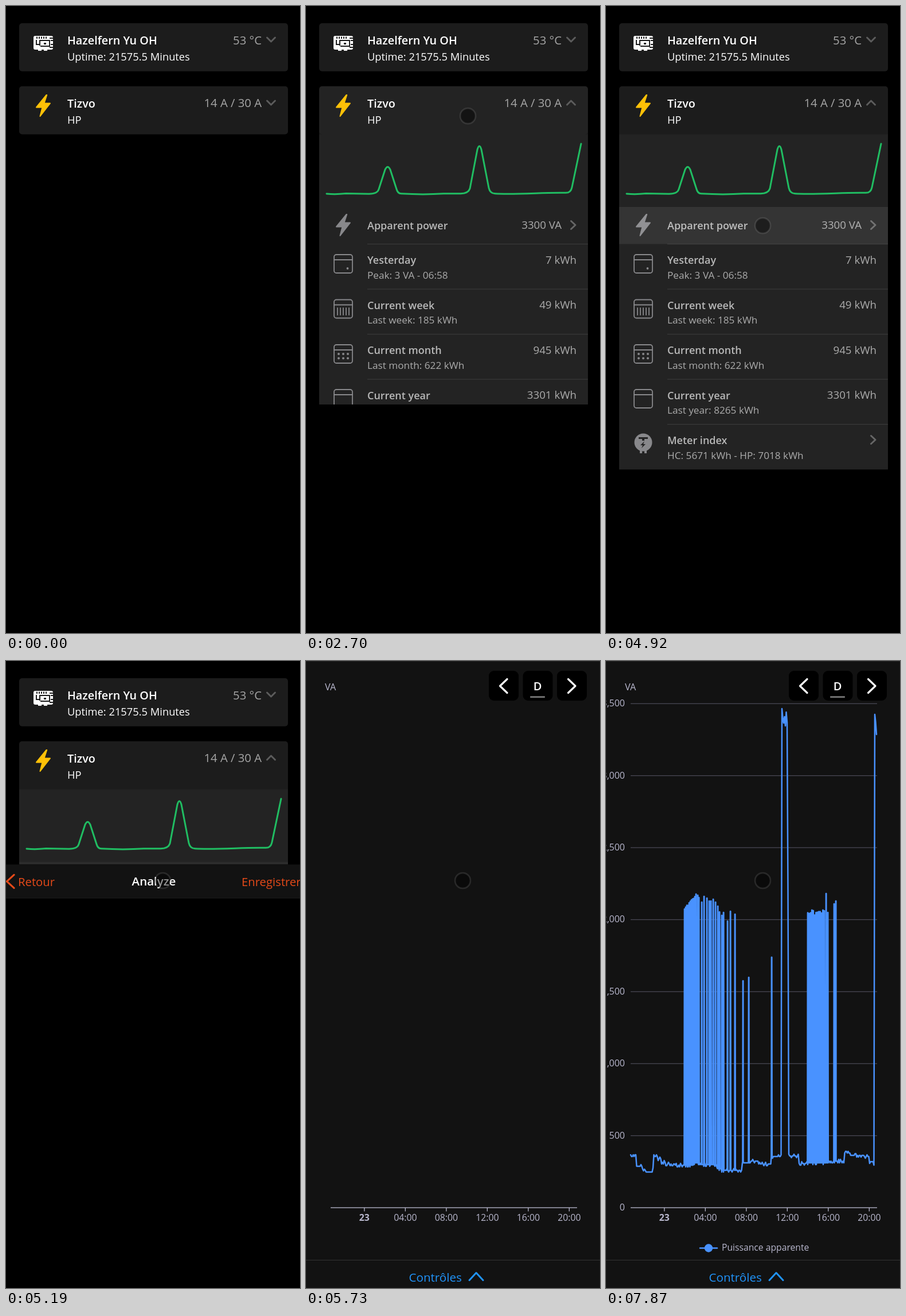
These frames come from a looping animation (513x1092 px, 8000 ms). An HTML page:

```html
<!DOCTYPE html>
<html lang="en">
<head>
<meta charset="utf-8">
<title>Energy dashboard</title>
<style>
  html, body { margin: 0; width: 100%; height: 100%; overflow: hidden; background: #000; }
  svg { display: block; width: 100vw; height: 100vh; font-family: "Open Sans", "Noto Sans", sans-serif; }
  .semi { font-weight: 600; }
  .bold { font-weight: 700; }
  .line { fill: none; stroke-linecap: round; stroke-linejoin: round; }
</style>
</head>
<body>
<svg id="stage" viewBox="0 0 513 1092" preserveAspectRatio="none"></svg>
<script>
const stage = document.getElementById('stage');
const LOOP = 8000;

// Markup helpers
const text = (x, y, size, fill, content, anchor = 'start', cls = '') =>
  `<text x="${x}" y="${y}" font-size="${size}" fill="${fill}" text-anchor="${anchor}" class="${cls}">${content}</text>`;
const rect = (x, y, w, h, fill, r = 0, extra = '') =>
  `<rect x="${x}" y="${y}" width="${w}" height="${h}" rx="${r}" fill="${fill}" ${extra}/>`;
const line = (d, color, width, extra = '') =>
  `<path class="line" d="${d}" stroke="${color}" stroke-width="${width}" ${extra}/>`;
const dot = (x, y, r, fill) => `<circle cx="${x}" cy="${y}" r="${r}" fill="${fill}"/>`;
const range = (n, fn) => Array.from({ length: n }, (_, i) => fn(i)).join('');
const bolt = (y, fill) =>
  `<path d="M70.5 155 53 176.5H63.5L59.5 192 77 169.5H66.5L71.2 155Z" transform="translate(0 ${y})"
    fill="${fill}" stroke="${fill}" stroke-width="2" stroke-linejoin="round"/>`;

function card(y, title, sub, value) {
  return text(107, y + 37, 19.8, '#fff', title, 'start', 'semi')
    + text(107, y + 65, 18.3, '#fff', sub)
    + text(446, y + 36.5, 20.3, '#a6a6a6', value, 'end');
}

function boardIcon() {
  const dark = '#1c1c1c';
  return rect(48, 52, 34, 24, '#fff', 3) + rect(56, 75, 6, 3, '#fff') + rect(66, 75, 6, 3, '#fff')
    + range(5, i => rect(53 + i * 4, 53.5, 2, 3.5, dark))
    + rect(76, 55, 6, 2, dark) + rect(78, 59, 4, 2, dark) + rect(78, 66, 4, 2, dark)
    + rect(52, 59, 2, 7, dark) + rect(52, 66, 6, 2, dark) + rect(58, 59, 17, 2, dark)
    + rect(58, 59, 2, 10, dark) + rect(75, 59, 2, 12, dark) + rect(60, 69, 15, 2, dark)
    + rect(66, 64, 4, 3, dark) + rect(76, 71, 6, 2, dark);
}

const GREY = '#88888b';
function calendar(y, marks) {
  return rect(49, y, 32, 32, 'none', 4, `stroke="${GREY}" stroke-width="1.8"`)
    + line(`M49 ${y + 9}H81`, GREY, 1.8) + marks;
}

function row(i, title, sub, value) {
  const y = 414.5 + i * 78.5;
  return rect(107, y - 0.5, 385, 1.2, '#3a3a3a')
    + text(107, y + 34.5, 18, '#b8b8b8', title, 'start', 'semi')
    + text(107, y + 60, 17.2, '#acacac', sub)
    + text(472, y + 34, 18.7, '#acacac', value, 'end');
}

function meterIcon() {
  const dark = '#232323';
  return dot(65, 760, 15.5, GREY) + rect(59, 772, 4, 7, GREY) + rect(67, 772, 4, 7, GREY)
    + rect(57, 751, 16, 3, dark) + rect(63, 751, 4, 6, dark)
    + `<path d="M67 758 60 765H64L62 770 69 763H65Z" fill="${dark}"/>`;
}

const sparkline = 'M36 327Q52 328.500 70 326.500Q95 327 110 327.300Q125 327 127 319L138 285Q142.500 275.500 147 285'
  + 'L158 319Q160 326.500 166 326.800Q205 329 240 326.800H270Q283 326.500 286 318L299 250Q302.500 238 306 250'
  + 'L319 317Q321 326.500 330 326.800Q350 328 400 326.300Q430 325 452 325.300Q462 326 464 316L480 240';

const panel = rect(23, 215, 469, 9, '#1c1c1c') + rect(23, 223.5, 469, 584, '#232323')
  + line(sparkline, '#20bd62', 3)
  + bolt(208, GREY)
  + text(107, 388.5, 18, '#b8b8b8', 'Apparent power', 'start', 'semi')
  + text(446, 388, 18.7, '#acacac', '3300 VA', 'end')
  + line('M462.500 374.500 470 381.500 462.500 388.500', '#666', 3)
  + row(0, 'Yesterday', 'Peak: 3 VA - 06:58', '7 kWh')
  + row(1, 'Current week', 'Last week: 185 kWh', '49 kWh')
  + row(2, 'Current month', 'Last month: 622 kWh', '945 kWh')
  + row(3, 'Current year', 'Last year: 8265 kWh', '3301 kWh')
  + row(4, 'Meter index', 'HC: 5671 kWh - HP: 7018 kWh', '')
  + line('M462.500 748.500 470 755.500 462.500 762.500', '#666', 3)
  + calendar(433, dot(72.5, 457, 1.9, GREY))
  + calendar(511.5, range(5, i => line(`M${55 + i * 5} 526V538`, GREY, 1.8)))
  + calendar(590, range(6, i => dot(57 + i % 3 * 8, 606 + (i > 2) * 7.5, 2, GREY)))
  + calendar(668, '') + meterIcon();

// Power curve: stepped base load with jitter, plus short load spikes
let seed = 11;
const random = () => (seed = seed * 16807 % 2147483647) / 2147483647;

const baseLoad = [[43, 863], [48, 860], [53, 880], [64, 885], [68, 890], [81, 886], [82.5, 863], [90, 867],
  [97, 873], [104, 876], [120, 878], [152, 874], [162, 877], [195, 884], [202, 887], [238, 874], [252, 871],
  [266, 876], [288, 863], [306, 83], [308, 100], [309.5, 108], [311, 100], [312.5, 110], [314, 86],
  [315, 104], [317, 398], [318, 862], [336, 875], [352, 874], [388, 871], [416, 857], [426, 861],
  [450, 863], [460, 875], [468.5, 93], [470, 110], [471, 128]];
const spikes = [[160, 408], [162, 412], [167, 420], [171, 410], [176, 413], [180, 418], [183, 418], [187, 415],
  [191, 420], [195, 427], [198, 437], [202, 443], [205, 438], [212, 453], [217, 436], [225, 441], [239, 557],
  [249, 551], [289, 516], [384, 405], [387, 438], [398, 423], [401, 418]];

function powerCurve() {
  const baseAt = x => baseLoad.findLast(p => p[0] <= x)[1];
  const points = [];
  for (let x = 43; x <= 472; x += 1.5) {
    const r = random();
    points.push([x, baseAt(x) + (r < 0.2 ? -3 : r > 0.8 ? 3 : 0)]);
  }
  const all = [...spikes];
  for (let x = 137; x < 158; x += 2) all.push([x, 433 - (x - 137) * 1.2 - random() * 3]);
  for (let x = 352; x < 381; x += 2.4) all.push([x, 430 + random() * 13]);
  for (const [x, top] of all) {
    const base = baseAt(x);
    points.push([x - 0.6, base], [x - 0.1, top], [x + 0.3, top], [x + 0.8, base]);
  }
  points.sort((a, b) => a[0] - b[0]);
  return 'M' + points.map(p => p.map(v => v.toFixed(1))).join('L');
}

const AXIS = '#b9b8ce', BLUE = '#4992ff', ORANGE = '#e64a19', LINK = '#2094fa';
const hours = ['23', '04:00', '08:00', '12:00', '16:00', '20:00'];
const loads = ['0', '500', '1,000', '1,500', '2,000', '2,500', '3,000', '3,500'];

const chartPage = rect(0, 1, 513, 1042, '#121212')
  + `<g id="data">`
  + loads.map((label, i) => {
    const y = 952 - i * 125.4;
    return (i ? rect(43, y - 0.6, 430, 1.3, '#484753') : '') + text(33, y + 5, 16, AXIS, label, 'end');
  }).join('')
  + `<g clip-path="url(#reveal)">` + line(powerCurve(), BLUE, 2.5) + `</g>`
  + line('M164 1022.500H194', BLUE, 2.5) + dot(179, 1022.5, 7.2, BLUE)
  + text(202, 1026.5, 15.7, AXIS, 'Puissance apparente') + `</g>`
  + rect(43, 951.5, 430, 1.3, AXIS)
  + hours.map((label, i) => {
    const x = 101.8 + i * 71.5;
    return rect(x - 0.6, 952, 1.3, 6.5, AXIS) + text(x, 974.5, 15.8, AXIS, label, 'middle', i ? '' : 'bold');
  }).join('')
  + text(33, 51, 16.2, AXIS, 'VA')
  + [319, 378.5, 438].map(x => rect(x, 17, 52, 52, '#000', 9)).join('')
  + line('M351 31.500 338.500 43.500 351 55.500M457.500 31.500 470 43.500 457.500 55.500', '#fff', 3.2)
  + text(404, 51, 20, '#fff', 'D', 'middle', 'semi') + rect(391, 61.3, 26, 2.6, '#777', 1);

const popup = rect(0, -58, 513, 1150, '#000')
  + rect(0, -58, 513, 58, '#121212') + rect(0, 0, 513, 1, '#222')
  + line('M14 -40 1.500 -28.500 14 -17', ORANGE, 3.2)
  + text(21, -20.5, 20.3, ORANGE, 'Retour') + text(411, -20.5, 20.3, ORANGE, 'Enregistrer')
  + text(258, -21, 20.5, '#fff', 'Analyze', 'middle', 'semi')
  + rect(0, 1043, 513, 49, '#121212') + rect(0, 1043, 513, 1, '#333')
  + text(179.5, 1081, 20.6, LINK, 'Contrôles') + line('M285 1078.500 297 1065.500 309 1078.500', LINK, 3)
  + `<g id="chartPage">${chartPage}</g>`;

stage.innerHTML = `<defs>
    <clipPath id="fold"><rect id="foldRect" x="23" y="215" width="469" height="0"/></clipPath>
    <clipPath id="reveal"><rect id="revealRect" x="40" y="60" width="0" height="900"/></clipPath>
  </defs>`
  + rect(0, 0, 513, 1092, '#000')
  + rect(23, 30, 469, 83.7, '#1c1c1c', 5) + rect(23, 139.7, 469, 83.8, '#1c1c1c', 5)
  + `<g clip-path="url(#fold)">${panel}</g>`
  + rect(23, 139.7, 469, 83.8, '#fff', 5, 'id="cardTap"') + rect(23, 350, 469, 64.5, '#fff', 0, 'id="rowTap"')
  + boardIcon() + card(30, 'Hazelfern Yu OH', 'Uptime: 21575.5 Minutes', '53 °C')
  + bolt(0, '#ffc107') + card(139.8, 'Tizvo', 'HP', '14 A / 30 A')
  + line('M455.500 55 462.500 62 469.500 55', '#5c5c5c', 3) + line('', '#5c5c5c', 3, 'id="arrow"')
  + `<g id="popup">${popup}</g>`
  + `<circle id="pointer" r="13.4" fill="#000" fill-opacity=".43" stroke="#fff" stroke-opacity=".115" stroke-width="2.6"/>`;

// Motion
const parts = Object.fromEntries(['foldRect', 'revealRect', 'cardTap', 'rowTap', 'arrow', 'popup',
  'chartPage', 'data', 'pointer'].map(id => [id, document.getElementById(id)]));
const progress = (t, from, to) => Math.min(1, Math.max(0, (t - from) / (to - from)));
const show = (node, on) => node.setAttribute('visibility', on ? 'inherit' : 'hidden');

// The CSS "ease" curve, cubic-bezier(.25, .1, .25, 1)
function ease(u) {
  const bezier = (a, b, s) => 3 * a * s * (1 - s) ** 2 + 3 * b * s * s * (1 - s) + s ** 3;
  let low = 0, high = 1;
  for (let i = 0; i < 24; i++) {
    const mid = (low + high) / 2;
    if (bezier(0.25, 0.25, mid) < u) low = mid; else high = mid;
  }
  return bezier(0.1, 1, high);
}

function pointerAt(t) {
  if (t < 1500) return [474.5, 1083.5];
  if (t < 3260) {
    const left = 1 - progress(t, 1500, 2240);
    return [282.5 + 214 * left ** 1.62, 191.5 + 434 * left ** 1.92];
  }
  const u = progress(t, 3260, 3860), s = u * u * (3 - 2 * u);
  return [282.5 - 9 * s - 12 * Math.sin(Math.PI * s), 191.5 + 191 * s];
}

function draw(t) {
  const open = t >= 2550;
  parts.foldRect.setAttribute('height', open ? 8.5 + 584 * ease(progress(t, 2550, 2850)) : 0);
  parts.arrow.setAttribute('d', open ? 'M455.500 172 462.500 165 469.500 172' : 'M455.500 165 462.500 172 469.500 165');
  parts.cardTap.setAttribute('opacity', t < 2310 ? 0 : 0.08 * (1 - progress(t, 2520, 2820)));
  parts.rowTap.setAttribute('opacity', t < 4850 ? 0 : 0.08 * (1 - progress(t, 5040, 5340)));

  const slide = ease(progress(t, 5042, 5442));
  parts.popup.setAttribute('transform', `translate(0 ${1150 * (1 - slide)})`);
  show(parts.popup, slide > 0);
  show(parts.chartPage, t >= 5730);
  show(parts.data, t >= 6740);
  parts.revealRect.setAttribute('width', 3 + 432 * progress(t, 6805, 7815));

  const [x, y] = pointerAt(t);
  parts.pointer.setAttribute('transform', `translate(${x} ${y})`);
  show(parts.pointer, t >= 1500 || (t >= 1170 && t < 1240));
}

const start = performance.now();
function tick() {
  draw((performance.now() - start) % LOOP);
  requestAnimationFrame(tick);
}
tick();
</script>
</body>
</html>
```
